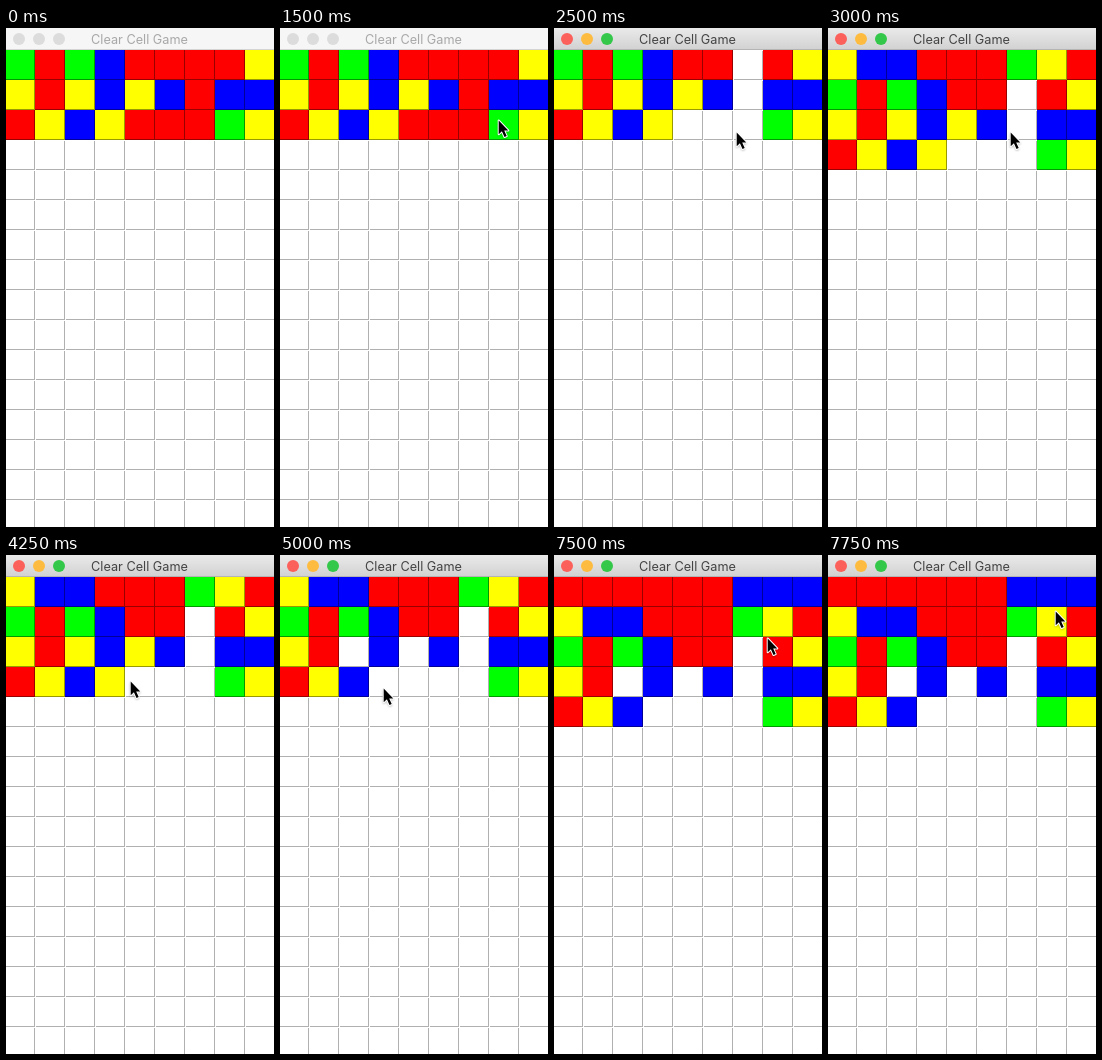
An HTML page for the animation above (8 s loop, 268x499 px).

```html
<!DOCTYPE html>
<html lang="en">
<head>
<meta charset="utf-8">
<title>Clear Cell Game</title>
<style>
html, body { margin: 0; width: 100%; height: 100%; overflow: hidden; background: #fff; }
svg { display: block; width: 268px; height: 499px; }
text { font: 12.7px Inter, "Liberation Sans", sans-serif; }
</style>
</head>
<body>
<svg viewBox="0 0 268 499">
  <defs>
    <linearGradient id="bar" x2="0" y2="1">
      <stop stop-color="#eaeaea"/>
      <stop offset="1" stop-color="#d2d2d2"/>
    </linearGradient>
    <filter id="soft" x="-50%" y="-50%" width="200%" height="200%">
      <feGaussianBlur stdDeviation=".8"/>
    </filter>
    <path id="arrow" d="M0 0V13.8L3.2 10.8L5.8 16.5L8 15.6L5.5 10H9.6Z"/>
  </defs>
  <rect width="268" height="499" fill="#fff"/>
  <g id="cells" shape-rendering="crispEdges"></g>
  <rect id="title" width="268" height="21"/>
  <rect id="edge" y="21" width="268" height="1"/>
  <g id="dots">
    <circle cx="13" cy="11" r="6"/>
    <circle cx="33" cy="11" r="6"/>
    <circle cx="53" cy="11" r="6"/>
  </g>
  <text id="label" x="133.5" y="16" text-anchor="middle">Clear Cell Game</text>
  <g id="cursor">
    <use href="#arrow" y="1.2" fill="#000" stroke="#000" opacity=".35" filter="url(#soft)"/>
    <use href="#arrow" fill="#000" stroke="#fff" stroke-width="2" stroke-linejoin="round" paint-order="stroke"/>
  </g>
</svg>
<script>
const LOOP = 8000, COLS = 9, ROWS = 16, SIZE = 30;
const COLORS = { R: '#ff0000', G: '#00ff00', B: '#0000ff', Y: '#ffff00' };
const DOTS = ['#fc605b', '#fdbc40', '#34c84a'];

// [start time, rows from the top]; a dot is an empty cell
const boards = [
  [0, 'GRGBRRRRY YRYBYBRBB RYBYRRRGY'],
  [2500, 'GRGBRR.RY YRYBYB.BB RYBY...GY'],
  [3000, 'YBBRRRGYR GRGBRR.RY YRYBYB.BB RYBY...GY'],
  [5000, 'YBBRRRGYR GRGBRR.RY YR.B.B.BB RYB....GY'],
  [7000, 'RRRRRRBBB YBBRRRGYR GRGBRR.RY YR.B.B.BB RYB....GY']
];

// [start time, x, y]
const moves = [
  [1500, 217, 91], [1750, 183, 111], [2000, 178, 104], [2250, 181, 103],
  [4250, 123, 125], [4500, 103, 131], [4750, 102, 132],
  [7000, 131, 126], [7250, 185, 103], [7500, 212, 82], [7750, 226, 55]
];

const $ = id => document.getElementById(id);
const at = (list, t) => list.filter(k => k[0] <= t).pop();
const rect = (x, y, w, h, fill) =>
  `<rect x="${x}" y="${y}" width="${w}" height="${h}" fill="${fill}"/>`;

function cell(c, r, color) {
  const x = c * SIZE - 1, y = 22 + r * SIZE, end = SIZE - 1;
  const line = color ? 'rgba(0,0,0,.4)' : '#b0b0b0';
  const gap = color ? 0 : 1;
  return rect(x, y, SIZE, SIZE, color || '#fff') +
    rect(x + end, y + gap, 1, SIZE - gap, line) +
    rect(x + gap, y + end, end - gap, 1, line);
}

function drawBoard(text) {
  const rows = text.split(' ');
  let out = '';
  for (let r = 0; r < ROWS; r++)
    for (let c = 0; c < COLS; c++)
      out += cell(c, r, COLORS[rows[r] && rows[r][c]]);
  $('cells').innerHTML = out;
}

function drawTitle(active) {
  $('title').setAttribute('fill', active ? 'url(#bar)' : '#f6f6f6');
  $('edge').setAttribute('fill', active ? '#b4b4b4' : '#d4d4d4');
  $('label').setAttribute('fill', active ? '#444' : '#a8a8a8');
  [...$('dots').children].forEach((dot, i) =>
    dot.setAttribute('fill', active ? DOTS[i] : '#dcdcdc'));
}

let shown;
function render(t) {
  const board = at(boards, t), move = at(moves, t);
  if (board !== shown) {
    shown = board;
    drawBoard(board[1]);
    drawTitle(t >= 2500);
  }
  const cursor = $('cursor');
  cursor.setAttribute('visibility', move ? 'visible' : 'hidden');
  if (move) cursor.setAttribute('transform', `translate(${move[1] + 1.7} ${move[2] + 1.5})`);
}

const start = performance.now();
function tick() {
  render((performance.now() - start) % LOOP);
  requestAnimationFrame(tick);
}
tick();
</script>
</body>
</html>
```
